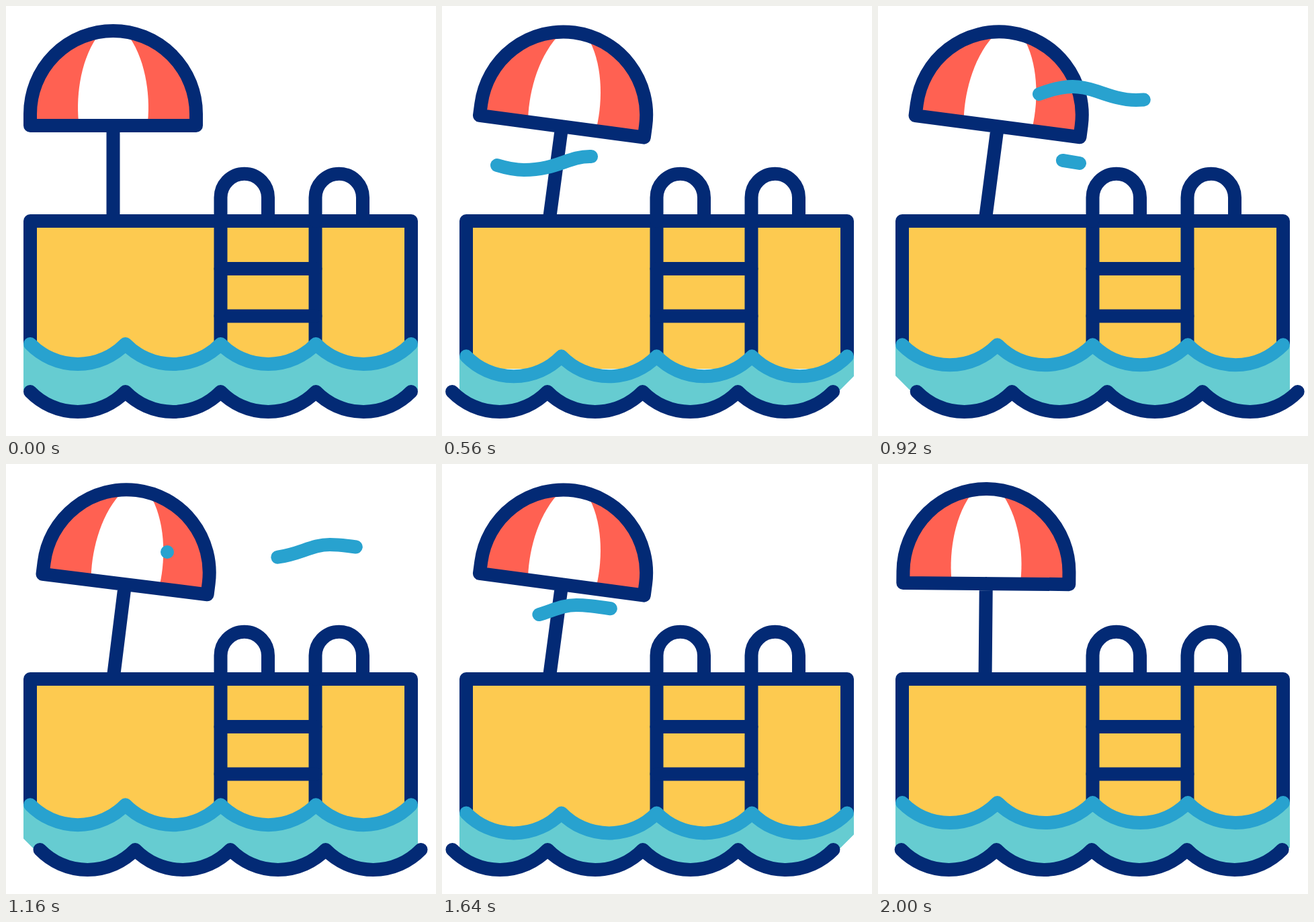
Write an HTML page that moves like this. It is 640x640 px and loops after 2.04 s.

```html
<!DOCTYPE html>
<html lang="en">
<head>
<meta charset="utf-8">
<title>Pool</title>
<style>
html, body { margin: 0; width: 100%; height: 100%; overflow: hidden; background: #fff; }
svg { display: block; width: 100%; height: 100%; }
.line { fill: none; stroke: #032a75; stroke-width: 20; stroke-linecap: round; stroke-linejoin: round; }
.blue { stroke: #28a2cf; }
</style>
</head>
<body>
<svg viewBox="0 0 640 640">
  <clipPath id="below"><path id="surface"/></clipPath>

  <g id="umbrella">
    <path fill="#ff6152" d="M36 178V160.5a123.5 123.5 0 0 1 247 0V178Z"/>
    <path fill="#fff" d="M108 172C104 130 112 75 140 40H179C207 75 215 130 211 172Z"/>
    <path class="line" d="M36 178V160.5a123.5 123.5 0 0 1 247 0V178ZM159.5 178V320"/>
  </g>

  <path fill="#fdca50" d="M36 320H603V540H36Z"/>
  <path class="line" style="stroke-linecap:butt" d="M36 540V320H603V540M319.5 320V540M460.5 320V540"/>
  <path class="line" d="M319.5 320V285a35.25 35.25 0 0 1 70.5 0V320M460.5 320V285a35.25 35.25 0 0 1 70.5 0V320M319.5 391H460.5M319.5 461.5H460.5"/>

  <g clip-path="url(#below)"><path id="water" fill="#66ccd1"/></g>
  <path id="top" class="line blue"/>
  <path id="bottom" class="line"/>
  <g id="winds"></g>
</svg>
<script>
const LOOP = 2040, STEP = 40;
const $ = id => document.getElementById(id);
const set = (el, name, value) => el.setAttribute(name, value);

// Four scallops, drawn from x = 36 to x = 603
const scallops = 'a98.8 98.8 0 0 0 141.75 0'.repeat(4);
set($('top'), 'd', 'M36 503' + scallops);
set($('bottom'), 'd', 'M36 574' + scallops);
set($('surface'), 'd', `M26 503H36${scallops}H613V640H26Z`);
set($('water'), 'd', `M-94 452L36 582V574${scallops}V582L733 452Z`);

// Each gust follows the same curve with its own delay and place
const gusts = [[0, 0, 0], [515, 262, -104], [960, -20, -14]].map(([delay, x, y]) => {
  const el = document.createElementNS('http://www.w3.org/2000/svg', 'path');
  set(el, 'class', 'line blue');
  set(el, 'd', 'M-22 235C20 219 40 223 64 231C84 238 102 244 122 244C170 244 188 224 220 224C240 224 270 229 300 234');
  set(el, 'transform', `translate(${x} ${y})`);
  $('winds').append(el);
  return { el, delay, length: el.getTotalLength() };
});

const smooth = u => u * u * (3 - 2 * u);
const soft = u => 0.6 * u + 0.4 * smooth(u);

// The first and last moves of the loop start and stop less gently
function keyed(keys, t) {
  const i = keys.findIndex(k => k[0] > t);
  const [t0, a] = keys[i - 1], [t1, b] = keys[i];
  const ease = i === 1 || i === keys.length - 1 ? soft : smooth;
  return a + (b - a) * ease((t - t0) / (t1 - t0));
}

const sway = [[0, 0], [500, 8], [720, 6], [1020, 8], [1320, 6], [1610, 8], [LOOP, 0]];
const drift = [[0, 0], [465, -25], [1005, 25], [1530, -25], [LOOP, 0]];
const level = [[0, 0], [465, 20], [1005, 0], [1530, 20], [LOOP, 0]];

const trim = t => 1 - (1 - Math.min(1, Math.max(0, t / 635))) ** 1.75;

function draw(t) {
  set($('umbrella'), 'transform', `rotate(${keyed(sway, t)} 159.5 320)`);
  const across = `translate(${keyed(drift, t)} 0)`;
  const down = `translate(0 ${keyed(level, t)})`;
  set($('bottom'), 'transform', across);
  set($('water'), 'transform', across);
  set($('top'), 'transform', down);
  set($('surface'), 'transform', down);

  for (const { el, delay, length } of gusts) {
    const head = trim(t - delay - 205) * length;
    const tail = trim(t - delay - 432) * length;
    const span = head - tail;
    set(el, 'visibility', span > 3 ? 'visible' : 'hidden');
    set(el, 'stroke-dasharray', `0 ${tail} ${span} ${2 * length}`);
  }
}

function tick() {
  draw(Math.floor(performance.now() % LOOP / STEP) * STEP);
  requestAnimationFrame(tick);
}
tick();
</script>
</body>
</html>
```
